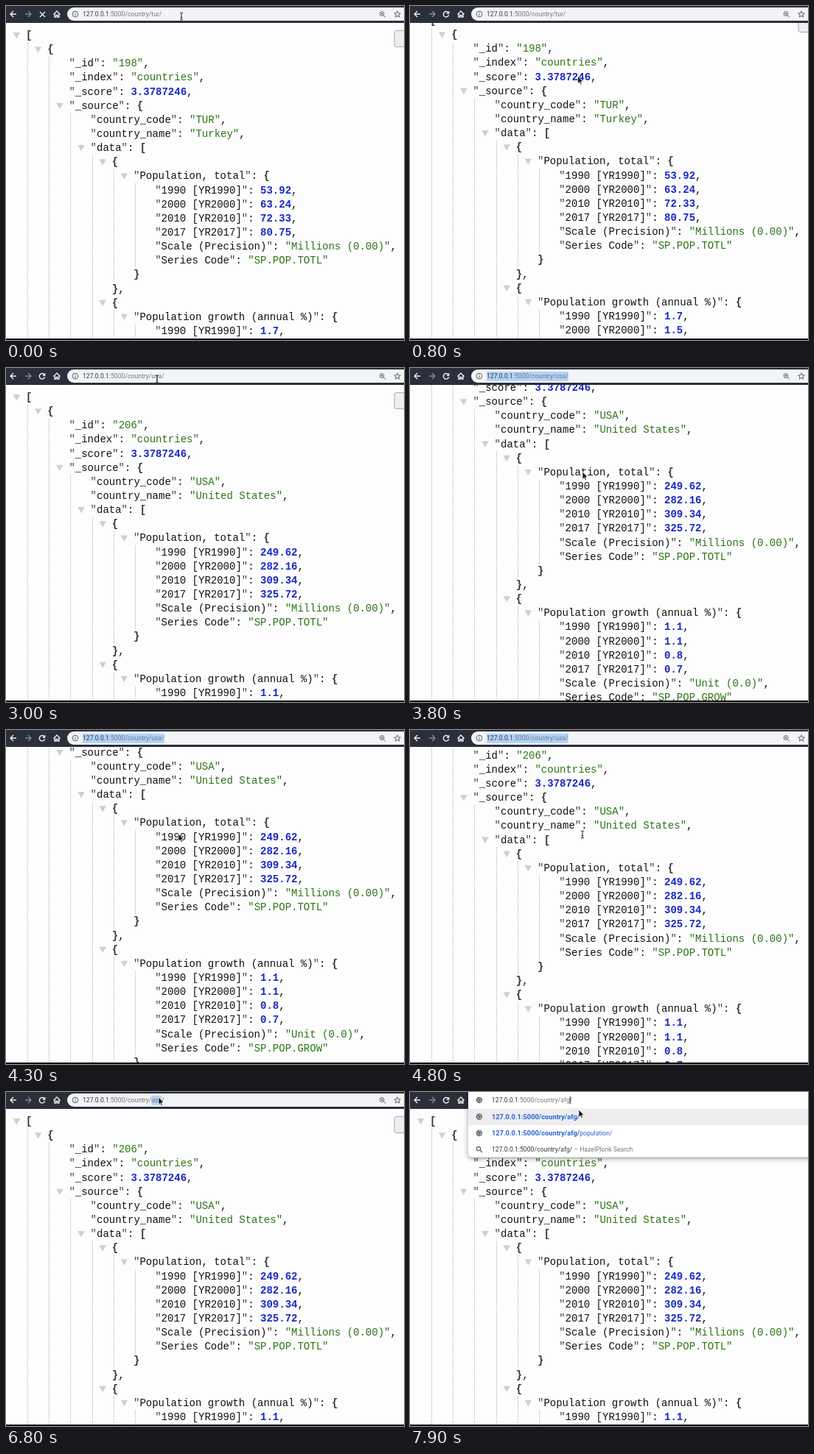
Animation, 540 px wide and 454 px high, one loop 8 s. Source, as an HTML page:

```html
<!DOCTYPE html>
<html lang="en">
<head>
<meta charset="utf-8">
<title>Country API</title>
<style>
  html, body { margin: 0; width: 100%; height: 100%; overflow: hidden; background: #fdfdfe; }
  svg { display: block; width: 540px; height: 454px; }
  text { white-space: pre; }
  .json { font: 14px "Liberation Mono", "Courier New", monospace; fill: #111; }
  .quote { fill: #444; }
  .str { fill: #2a7414; }
  .num { fill: #1a28c4; font-weight: bold; }
  .brace { font-weight: bold; fill: #333; }
  .guide { stroke: #a4a4a4; stroke-dasharray: 1 1.4; }
  .ui { font: 8.65px Roboto, Inter, sans-serif; fill: #33363b; }
  .soft { fill: #74777c; }
  .link { fill: #2563d4; }
  .bold { font-weight: bold; font-size: 9.25px; }
  .line { fill: none; stroke-width: 1.4; }
  .shade { filter: drop-shadow(0 2px 3px rgba(0, 0, 0, .38)); }
</style>
</head>
<body>
<svg viewBox="0 0 540 454">
  <defs>
    <clipPath id="view"><rect y="23" width="540" height="429"/></clipPath>
    <g id="globe">
      <circle r="4.2" fill="#5c6066"/>
      <path d="M-3 -1.5L-1 .2L-1.4 2.6M0 -3.5L.8 -1.6L2.8 -1.8M1 3.2L1.4 1L3.6 .6" stroke="#eee" fill="none"/>
    </g>
    <g id="lens" fill="none" stroke="#5c6066" stroke-width="1.2">
      <circle cx="-1" cy="-1" r="2.7"/><path d="M1 1L4 4"/>
    </g>
  </defs>
  <rect width="540" height="454" fill="#fdfdfe"/>
  <g clip-path="url(#view)">
    <g id="page">
      <g id="tur"></g>
      <g id="usa"></g>
      <rect x="527" y="33.5" width="40" height="22" rx="2.5" fill="#eeeeef" stroke="#aaa"/>
    </g>
  </g>
  <rect y="452" width="540" height="2" fill="#050505"/>

  <rect width="540" height="23" fill="#2b2f3a"/>
  <path class="line" stroke="#f0f1f3" d="M14 11H6M10 7L6 11L10 15"/>
  <path class="line" stroke="#858994" d="M26 11H34M30 7L34 11L30 15"/>
  <path id="stop" class="line" stroke="#f0f1f3" d="M46 8L53 15M53 8L46 15"/>
  <g id="reload">
    <path class="line" stroke="#f0f1f3" d="M51.8 8.8A3.7 3.7 0 1 0 52.6 12.3"/>
    <path fill="#f0f1f3" d="M53.4 6.6V10.8H49.2Z"/>
  </g>
  <path class="line" stroke="#f0f1f3" d="M64.5 11.5L69 7L73.5 11.5M66 10.5V15H68V12.4H70V15H72V10.5"/>

  <g id="bar">
    <rect x="83" y="2" width="480" height="18" rx="9" fill="#f3f4f6"/>
    <g class="line" stroke="#5c6066" style="stroke-width:1">
      <circle cx="94" cy="11" r="3.9"/>
      <path d="M94 10.3V13.3M94 8.4V9.4"/>
      <circle cx="510" cy="10.5" r="2.9"/>
      <path d="M512 12.5L515 15.5M508.6 10.5H511.4M510 9.1V11.9"/>
      <path d="M531 6.8L532.2 9.8L535.3 10L532.9 12L533.7 15L531 13.4L528.3 15L529.1 12L526.7 10L529.8 9.8Z"/>
    </g>
  </g>

  <g id="drop">
    <rect id="panel" class="shade" x="79" y="-6" width="480" rx="5" fill="#fff"/>
    <rect x="79" y="22.5" width="461" height="22.5" fill="#ededf0"/>
    <use href="#globe" x="94" y="11"/>
    <use href="#globe" x="94" y="33.5"/>
    <text class="ui link bold" x="111" y="36.8" id="first"></text>
    <g id="extra">
      <use href="#globe" x="94" y="56"/>
      <text class="ui link" x="111" y="59.2"><tspan class="bold" id="second"></tspan>population/</text>
    </g>
    <g id="search">
      <use href="#lens" x="94" y="56"/>
      <text class="ui" x="111" y="59.2"><tspan id="query"></tspan><tspan class="soft"> – HazelPlonk Search</tspan></text>
    </g>
  </g>
  <rect id="mark" y="5" height="13" fill="#b3d3fb"/>
  <text id="url" class="ui" y="14.4">127.0.0.1<tspan id="path" class="soft"></tspan></text>
  <rect id="caret" y="6" width="1" height="10.5" fill="#222"/>

  <path id="beam" fill="none" stroke="#222" d="M-2 -5Q0 -5 0 -3.5Q0 -5 2 -5M0 -3.5V3.5M-2 5Q0 5 0 3.5Q0 5 2 5M-1.2 1.5H1.2"/>
  <path id="arrow" fill="#111" stroke="#fff" stroke-width=".7" d="M0 -5V5.2L2.3 3.2L3.8 6.6L5.4 5.9L3.9 2.6H7Z"/>
</svg>
<script>
const $ = id => document.getElementById(id);
const ROW = 19.14, INDENT = 29.2;
const HOST = "127.0.0.1", BASE = ":5000/country/";
const YEARS = [1990, 2000, 2010, 2017];

const span = (cls, s) => `<tspan class="${cls}">${s}</tspan>`;
const quoted = s => span("quote", '"') + s + span("quote", '"');
const key = (k, v) => quoted(k) + ": " + v;
const str = s => span("str", `"${s}"`) + ",";
const num = n => span("num", n) + ",";
const brace = s => span("brace", s);

function series(name, values, scale, code) {
  return [
    [4, brace("{"), 1],
    [5, key(name, brace("{")), 1],
    ...YEARS.map((y, i) => [6, key(`${y} [YR${y}]`, num(values[i]))]),
    [6, key("Scale (Precision)", str(scale))],
    [6, key("Series Code", span("str", `"${code}"`))],
    [5, brace("}")],
    [4, brace("}") + ","]
  ];
}

function drawPage(id, docId, code, name, totals, growth) {
  const rows = [
    [0, brace("["), 1],
    [1, brace("{"), 1],
    [2, key("_id", str(docId))],
    [2, key("_index", str("countries"))],
    [2, key("_score", num("3.3787246"))],
    [2, key("_source", brace("{")), 1],
    [3, key("country_code", str(code))],
    [3, key("country_name", str(name))],
    [3, key("data", brace("[")), 1],
    ...series("Population, total", totals, "Millions (0.00)", "SP.POP.TOTL"),
    ...series("Population growth (annual %)", growth, "Unit (0.0)", "SP.POP.GROW")
  ];
  $(id).innerHTML = rows.map(([depth, body, opens], r) => {
    const x = depth * INDENT, y = 44 + r * ROW;
    let out = `<text class="json" x="${27 + x}" y="${y}">${body}</text>`;
    if (opens) {
      let end = rows.findIndex((row, i) => i > r && row[0] <= depth);
      if (end < 0) end = rows.length;
      const gx = Math.round(29 + x) + .5;
      out += `<path fill="#cfcfcf" d="M${9.7 + x} ${y - 8}h9.4l-4.7 8.4z"/>
        <path class="guide" d="M${gx} ${y + 6}V${y + 6 + (end - r - 1) * ROW}"/>`;
    }
    return out;
  }).join("");
}

drawPage("tur", "198", "TUR", "Turkey",
  ["53.92", "63.24", "72.33", "80.75"], ["1.7", "1.5", "1.3", "1.5"]);
drawPage("usa", "206", "USA", "United States",
  ["249.62", "282.16", "309.34", "325.72"], ["1.1", "1.1", "0.8", "0.7"]);

// Stepped tracks: [time, value]
const steps = {
  page: [[0, "tur"], [2200, ""], [2300, "usa"]],
  word: [[0, "tur"], [1400, "u"], [1600, "us"], [1800, "usa"], [6900, "a"], [7300, "af"], [7500, "afg"]],
  menu: [[0, 0], [1400, 2], [2100, 0], [6900, 2], [7500, 3]],
  mark: [[0, ""], [1200, "word"], [1400, ""], [3500, "all"], [5500, ""], [6500, "word"], [6900, ""]],
  busy: [[0, true], [300, false], [2100, true], [2900, false]],
  pointer: [[0, "beam"], [300, "arrow"], [900, "beam"], [3500, "arrow"], [4700, "beam"], [5500, "arrow"]]
};

// Linear tracks: [time, value, ...]
const scroll = [[0, 0], [300, 0], [500, 50], [650, 50], [900, 0], [3600, 0], [3800, 89.5],
  [4000, 105], [4400, 105], [4800, 43.5], [5200, 43.5], [5600, 0]];
const mouse = [[0, 238, 14], [200, 238, 14], [400, 234, 143], [700, 234, 143], [1000, 215, 15],
  [1600, 205, 15], [3200, 205, 15], [3500, 234, 146], [4600, 234, 146], [4800, 234, 142],
  [5300, 234, 142], [5700, 207, 12], [7300, 207, 12], [7800, 229, 29]];

const at = (track, t) => track.filter(k => k[0] <= t).pop()[1];

function mix(track, t) {
  const i = track.findIndex(k => k[0] > t);
  if (i < 0) return track[track.length - 1].slice(1);
  const a = track[i - 1], b = track[i], f = (t - a[0]) / (b[0] - a[0]);
  return a.slice(1).map((v, j) => v + (b[j + 1] - v) * f);
}

const show = (id, on) => $(id).style.display = on ? "" : "none";
const move = (id, x, y) => $(id).setAttribute("transform", `translate(${x} ${y})`);

function render(t) {
  const now = {};
  for (const name in steps) now[name] = at(steps[name], t);
  show("tur", now.page === "tur");
  show("usa", now.page === "usa");
  move("page", 0, -mix(scroll, t)[0]);
  show("stop", now.busy);
  show("reload", !now.busy);

  const path = BASE + now.word + "/", full = HOST + path;
  const left = now.menu ? 111 : 104, url = $("url");
  $("path").textContent = path;
  url.setAttribute("x", left);
  const widthTo = n => url.getSubStringLength(0, n);
  const wordStart = (HOST + BASE).length, wordEnd = full.length - 1;

  show("bar", !now.menu);
  show("drop", now.menu);
  show("extra", now.menu === 3);
  $("panel").setAttribute("height", 28 + now.menu * 22.2);
  move("search", 0, now.menu === 3 ? 22 : 0);
  for (const id of ["first", "second", "query"]) $(id).textContent = full;

  show("mark", now.mark);
  if (now.mark) {
    const from = now.mark === "all" ? 0 : widthTo(wordStart);
    const to = now.mark === "all" ? widthTo(full.length) : widthTo(wordEnd);
    $("mark").setAttribute("x", left + from);
    $("mark").setAttribute("width", to - from);
  }
  show("caret", now.menu);
  $("caret").setAttribute("x", left + widthTo(wordEnd));

  const [x, y] = mix(mouse, t);
  for (const id of ["beam", "arrow"]) {
    show(id, now.pointer === id);
    move(id, x, y);
  }
}

let last = -1;
function tick() {
  const t = Math.floor(performance.now() % 8000 / 100) * 100;
  if (t !== last) render(last = t);
  requestAnimationFrame(tick);
}
tick();
</script>
</body>
</html>
```
